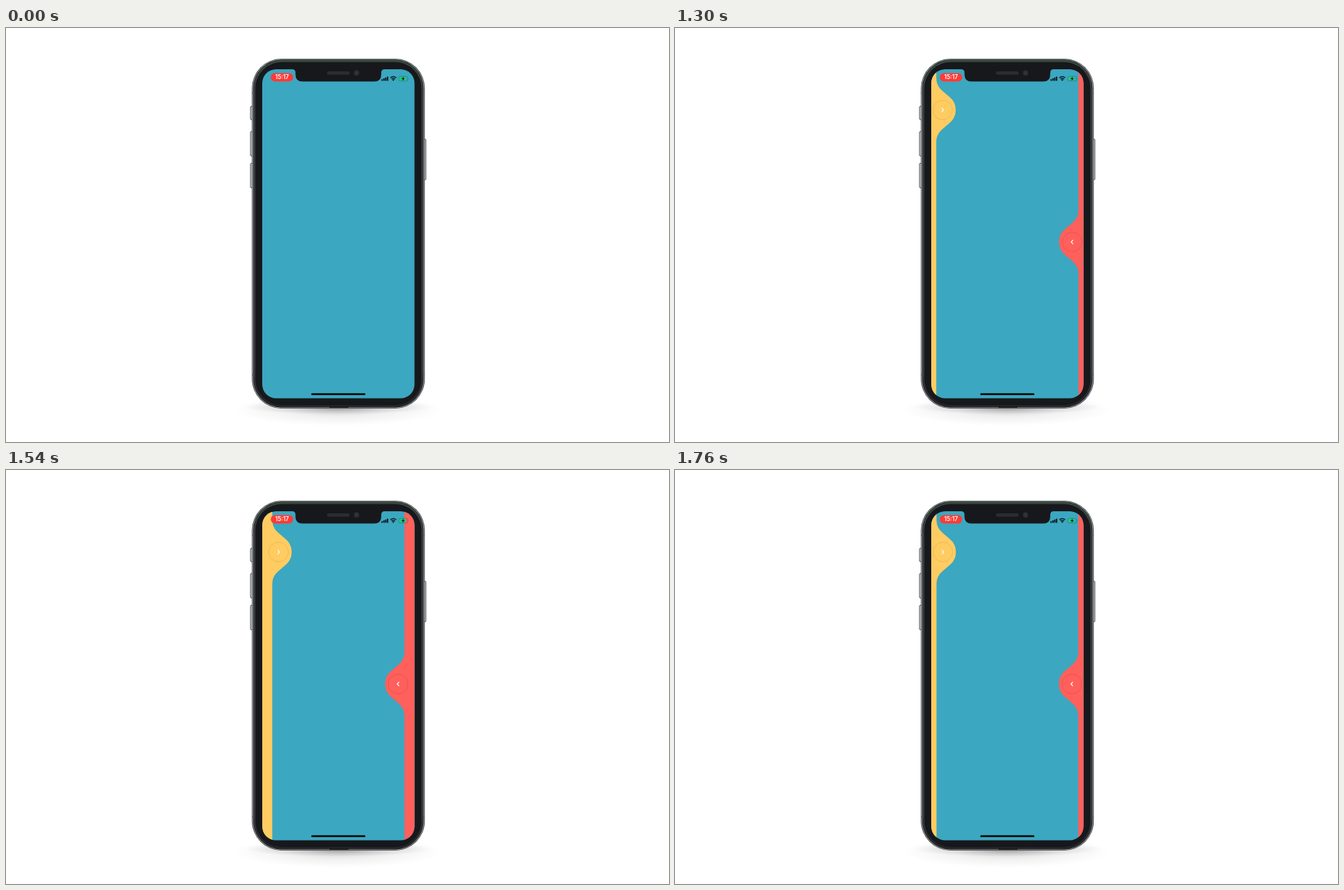
An HTML page for the animation above (2900 ms loop, 947 px wide and 592 px high).

```html
<!DOCTYPE html>
<html lang="en">
<head>
<meta charset="utf-8">
<title>Liquid drawers</title>
<style>
html, body { margin: 0; width: 100%; height: 100%; overflow: hidden; background: #fff; }
svg { display: block; width: 100%; height: 100%; }
</style>
</head>
<body>
<svg viewBox="0 0 947 592">
  <defs>
    <clipPath id="screen"><rect x="366" y="59" width="217.5" height="470.5" rx="20"/></clipPath>
    <radialGradient id="shade">
      <stop offset="0" stop-color="#000" stop-opacity=".42"/>
      <stop offset=".5" stop-color="#000" stop-opacity=".15"/>
      <stop offset="1" stop-color="#000" stop-opacity="0"/>
    </radialGradient>
    <linearGradient id="rim" x2="0" y2="1">
      <stop offset="0" stop-color="#3c4a42"/>
      <stop offset=".08" stop-color="#3a3d40"/>
      <stop offset=".9" stop-color="#3a3d40"/>
      <stop offset="1" stop-color="#232529"/>
    </linearGradient>
    <linearGradient id="steel" x2="0" y2="1">
      <stop offset="0" stop-color="#7f9186"/>
      <stop offset=".08" stop-color="#a5a7aa"/>
      <stop offset=".9" stop-color="#a5a7aa"/>
      <stop offset="1" stop-color="#8a8c8f"/>
    </linearGradient>
  </defs>

  <ellipse cx="474" cy="546" rx="150" ry="23" fill="url(#shade)" opacity=".35"/>
  <ellipse cx="474" cy="542" rx="134" ry="11" fill="url(#shade)" opacity=".8"/>

  <g id="keys" fill="#d4d5d7" stroke="#3d3f42" stroke-width=".9"></g>

  <rect x="351.3" y="44" width="246.9" height="500" rx="42" fill="#2a2d2f"/>
  <rect x="352.6" y="45.3" width="244.3" height="497.4" rx="40.7" fill="#17181a" stroke="url(#steel)" stroke-width="1.1"/>
  <rect x="355" y="47.6" width="239.6" height="492.8" rx="38.5" fill="#16171b" stroke="url(#rim)" stroke-width="2.4"/>
  <rect x="358" y="51" width="233.5" height="486.5" rx="34" fill="#17181c"/>
  <path d="M462 542h27" stroke="#111214" stroke-width="1.4"/>
  <path d="M351.5 93h2.5M351.5 496h2.5M595.5 93h2.5M595.5 496h2.5" stroke="#55585b" stroke-width="1.6"/>

  <g clip-path="url(#screen)">
    <rect x="365" y="58" width="220" height="473" fill="#3ca7c0"/>
    <g id="left"></g>
    <g id="right"></g>
    <rect x="436" y="522.3" width="77.4" height="2.8" rx="1.4" fill="#0c1012"/>
  </g>

  <path d="M408 57H541V59C537.6 59 536 60.6 536 64V66.5Q536 76.5 526 76.5H423.500Q413.500 76.500 413.500 66.500V64C413.500 60.600 412 59 408 59Z" fill="#17181c"/>
  <rect x="458.500" y="62" width="32.500" height="4.800" rx="2.400" fill="#2c2d31"/>
  <circle cx="500.700" cy="64.200" r="3.900" fill="#2b2c33"/>
  <circle cx="500.700" cy="64.200" r="1.900" fill="#343540"/>

  <rect x="378.200" y="64.400" width="32" height="12.200" rx="6.100" fill="#ff3b36"/>
  <text x="394.300" y="73.400" text-anchor="middle" font-family="Inter, sans-serif" font-weight="600" font-size="8.300" fill="#fff">15:17</text>

  <g fill="#0b1418">
    <g id="bars"></g>
    <path d="M553.200 75.700L551.500 73.900Q553.200 72.700 554.900 73.900Z"/>
    <g fill="none" stroke="#0b1418" stroke-width="1.250">
      <path d="M550.600 72.950Q553.200 70.850 555.800 72.950"/>
      <path d="M548.900 71.150Q553.200 67.650 557.500 71.150"/>
    </g>
  </g>
  <rect x="560.900" y="69.300" width="12.800" height="6.400" rx="1.900" fill="none" stroke="#16694f" stroke-opacity=".65" stroke-width=".7"/>
  <rect x="561.700" y="70.100" width="9.400" height="4.800" rx="1.100" fill="#20c978"/>
  <path d="M574.500 71.500q1 1 0 2z" fill="#16694f" opacity=".65"/>
  <path d="M568.300 69.500L564.800 72.900H567L566.200 75.500L569.700 72.100H567.500Z" fill="#0b1418"/>
</svg>
<script>
const LOOP = 2900, START = 1180, END = 1760, STEP = 20;
const BULGE = 27.7, HALF = 46;
const $ = id => document.getElementById(id);

$('keys').innerHTML = [[349.2, 112, 19], [349.2, 148, 35], [349.2, 193.5, 35], [596.3, 159, 58]]
  .map(([x, y, h]) => `<rect x="${x}" y="${y}" width="3.500" height="${h}" rx="1"/>`).join('');

$('bars').innerHTML = [2.3, 3.5, 4.7, 6]
  .map((h, i) => `<rect x="${536.2 + i * 2.65}" y="${75.5 - h}" width="1.900" height="${h}" rx=".5"/>`).join('');

// Drawer with its edge at x = 0, opening to the right, bulge centred on y.
function drawer(y, fill, ring) {
  const mx = BULGE / 2, my = HALF / 2, k = 12.7;
  const path = `M-300 40V${-0 + 40}H0V${y - HALF}
    C0 ${y - HALF + k} ${mx - 6} ${y - my - 5} ${mx} ${y - my}
    S${BULGE} ${y - k} ${BULGE} ${y}
    S${mx + 6} ${y + my - 5} ${mx} ${y + my}
    S0 ${y + HALF - k} 0 ${y + HALF}V540H-300Z`;
  return `<path d="${path}" fill="${fill}"/>
    <circle cx="9" cy="${y}" r="14" fill="none" stroke="${ring}" stroke-width=".8"/>
    <path d="M8 ${y - 2.6}l2.300 2.600l-2.300 2.600" fill="none" stroke="#fff" stroke-width="1.200" stroke-linecap="round" stroke-linejoin="round"/>`;
}
$('left').innerHTML = drawer(117.3, '#ffcc61', '#e5b457');
$('right').innerHTML = drawer(306, '#ff605c', '#e4514f');

// Underdamped spring around its resting inset.
function inset(ms) {
  const t = (ms - 1305) / 1000;
  return 8.3 + 26.6 * Math.exp(-6.1 * t) * Math.sin(8 * t);
}

function draw(ms) {
  const t = Math.floor(ms / STEP) * STEP;
  const x = t < START ? -60 : inset(Math.min(t, END));
  $('left').setAttribute('transform', `translate(${366 + x} 0)`);
  $('right').setAttribute('transform', `translate(${583.5 - x} 0) scale(-1 1)`);
}

const begin = performance.now();
function tick() {
  draw((performance.now() - begin) % LOOP);
  requestAnimationFrame(tick);
}
draw(0);
tick();
</script>
</body>
</html>
```
